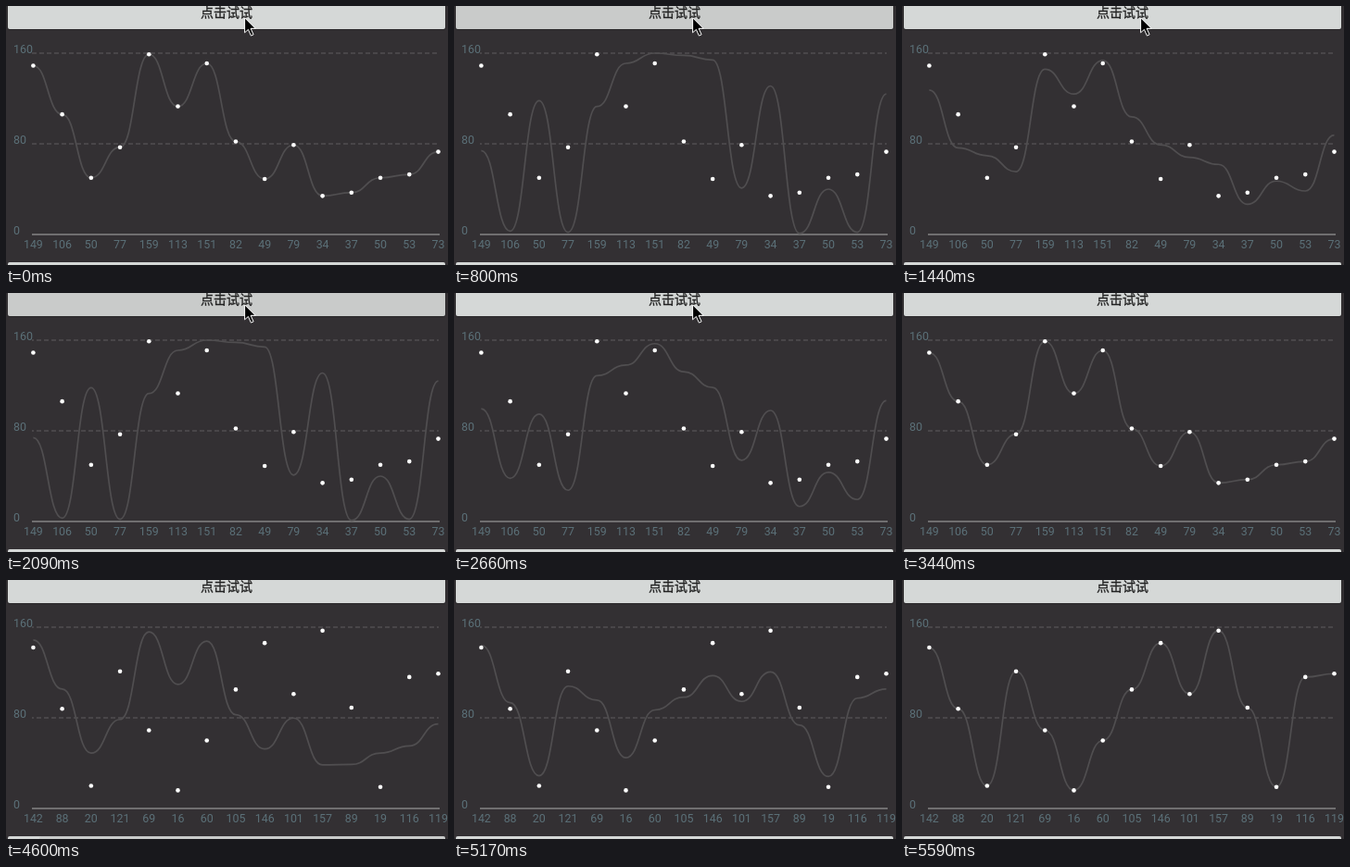
An HTML page for the animation above (6690 ms loop, 477 px wide and 280 px high).

```html
<!DOCTYPE html>
<html lang="zh">
<head>
<meta charset="utf-8">
<style>
  html, body { margin: 0; width: 100%; height: 100%; overflow: hidden; background: #333033; }
  svg { display: block; width: 477px; height: 280px; }
  .label { font: 12.4px Roboto, sans-serif; fill: #5b7078; }
  .caption { font: 500 14px "Noto Sans CJK SC", "Noto Sans CJK", sans-serif; fill: #222; stroke: #222; stroke-width: .3; }
  .button { fill: #d5d8d7; }
</style>
</head>
<body>
<svg viewBox="0 0 477 280">
  <rect x="1.5" y="-20" width="473" height="46" rx="2.5" fill="#282628"/>
  <rect class="button" x="2" y="-20" width="472" height="45" rx="2"/>
  <rect id="upperPress" x="2" y="-20" width="472" height="45" rx="2"/>
  <text class="caption" x="238" y="12.2" text-anchor="middle">点击试试</text>

  <rect class="button" x="2" y="277" width="472" height="30" rx="2"/>
  <rect id="lowerPress" x="36" y="277" width="438" height="30" rx="2"/>

  <path id="grid" d="M28 51H467M28 149H467" stroke="#504e50" stroke-width="1.6" stroke-dasharray="5 3"/>
  <path d="M28 247H468" stroke="#858485" stroke-width="1.6"/>
  <text class="label" x="8" y="51">160</text>
  <text class="label" x="8" y="149">80</text>
  <text class="label" x="8" y="247">0</text>

  <path id="curve" fill="none" stroke="#504e50" stroke-width="1.7"/>
  <g id="points"></g>
  <path id="cursor" d="M0 0V16L3.8 12.6 6.8 19.3 9.5 18.1 6.5 11.5H11.5Z" stroke="#fff"/>
</svg>
<script>
const LOOP = 6690;
const STEP = 0.128; // share of the easing covered by one screen refresh

const initial = [74, 3, 118, 2, 113, 151, 160, 158, 154, 41, 131, 1, 40, 2, 124];
const first = [149, 106, 50, 77, 159, 113, 151, 82, 49, 79, 34, 37, 50, 53, 73];
const second = [142, 88, 20, 121, 69, 16, 60, 105, 146, 101, 157, 89, 19, 116, 119];

// lead: refreshes already eased (or still waiting) when the run appears
const runs = [
  { show: 800, end: 1680, steps: 7, lead: 0, from: initial, to: first, press: 'upperPress' },
  { show: 2090, end: 3290, steps: 9, lead: -0.9, from: initial, to: first, press: 'upperPress' },
  { show: 4600, end: 5590, steps: 8, lead: 0.95, from: first, to: second, press: 'lowerPress' }
];

const find = id => document.getElementById(id);
const clamp = v => Math.min(1, Math.max(0, v));
const ease = t => (1 - Math.cos(Math.PI * clamp(t))) / 2;
const xAt = i => 29.4 + 31.22 * i;
const yAt = value => 247 - 1.225 * value;

function make(name, attributes) {
  const node = document.createElementNS('http://www.w3.org/2000/svg', name);
  for (const key in attributes) node.setAttribute(key, attributes[key]);
  return find('points').appendChild(node);
}

const dots = first.map((_, i) => make('circle', { cx: xAt(i), r: 2.3, fill: '#fff' }));
const labels = first.map((_, i) => make('text', { class: 'label', x: xAt(i), y: 262, 'text-anchor': 'middle' }));

// Each segment leaves and enters its points horizontally.
function curvePath(values) {
  return values.map((value, i) => {
    const x = xAt(i), y = yAt(value);
    if (!i) return `M${x} ${y}`;
    const middle = (xAt(i - 1) + x) / 2;
    return `C${middle} ${yAt(values[i - 1])} ${middle} ${y} ${x} ${y}`;
  }).join('');
}

function drawChart(time) {
  const started = runs.filter(r => r.show <= time).pop();
  const run = started || runs[0];
  const refresh = started ? Math.floor((time - run.show) / (run.end - run.show) * run.steps) : run.steps;
  const settled = refresh >= run.steps;
  const progress = settled ? 1 : ease((refresh + run.lead) * STEP);

  find('curve').setAttribute('d', curvePath(run.to.map((v, i) => run.from[i] + (v - run.from[i]) * progress)));
  run.to.forEach((value, i) => {
    dots[i].setAttribute('cy', yAt(value));
    labels[i].textContent = value;
  });

  // The dashes swap phase on every redraw.
  find('grid').setAttribute('stroke-dashoffset', settled || refresh % 2 ? 0 : -5);
  for (const id of ['upperPress', 'lowerPress'])
    find(id).setAttribute('fill-opacity', id === run.press ? 0.06 * clamp(1 - refresh / 2) : 0);
}

// The pointer speeds up towards the lower button and leaves the stage.
function drawCursor(time) {
  const u = Math.max(0, Math.floor((time - 2890) / 133) / 3);
  find('cursor').setAttribute('transform', `translate(${257.6 + 21 * u} ${12.8 + 250 * u ** 3})`);
}

const origin = performance.now();
function frame() {
  const time = (performance.now() - origin) % LOOP;
  drawChart(time);
  drawCursor(time);
  requestAnimationFrame(frame);
}
frame();
</script>
</body>
</html>
```
